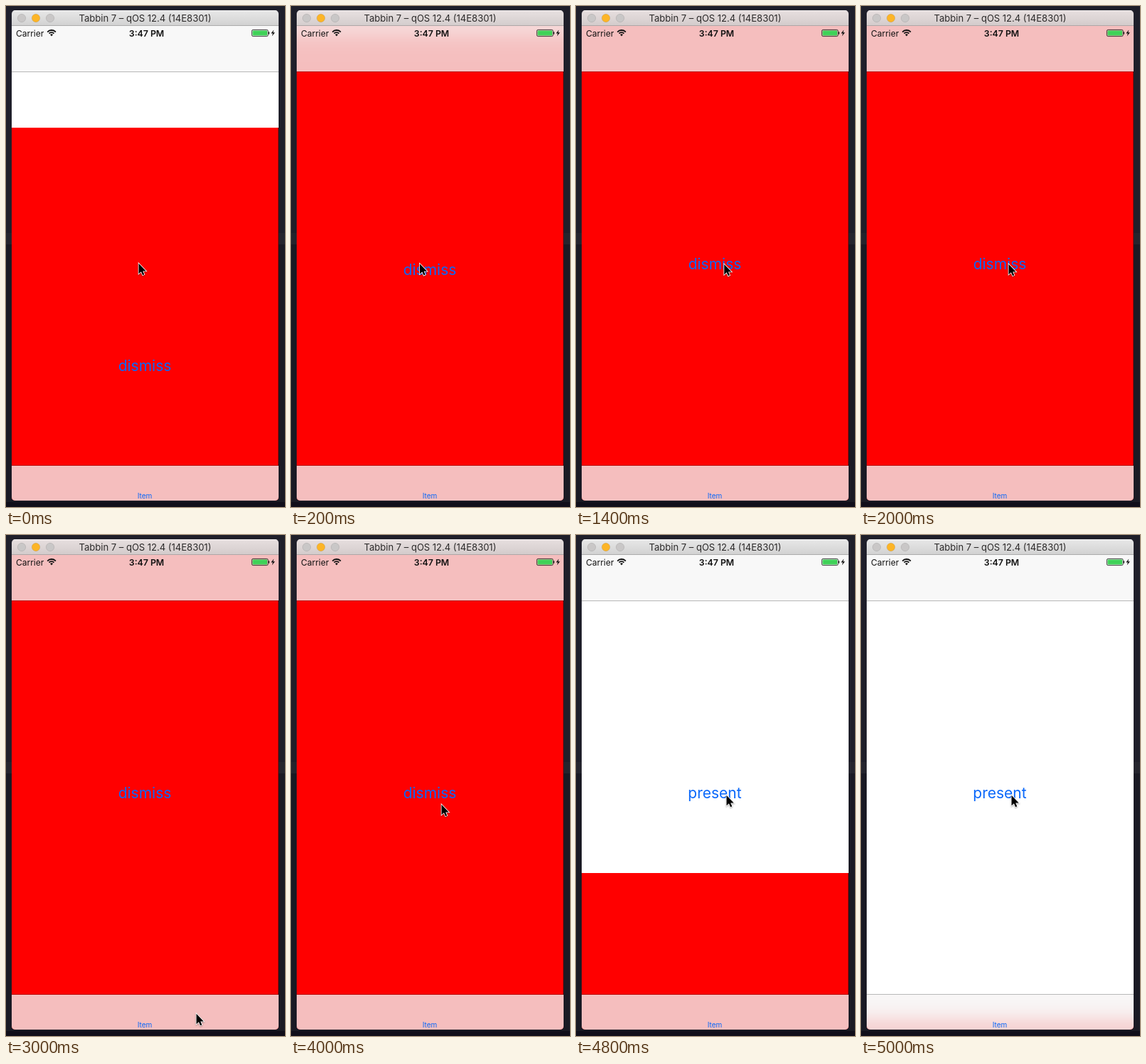
An HTML page with a canvas for the animation above (5.1 s loop, 392 by 704 pixels).

```html
<!DOCTYPE html>
<html lang="en">
<head>
<meta charset="utf-8">
<title>Modal transition</title>
<style>
html, body { margin: 0; width: 100%; height: 100%; overflow: hidden; background: #1d1d28; }
canvas { display: block; width: 392px; height: 704px; }
</style>
</head>
<body>
<canvas id="stage" width="392" height="704"></canvas>
<script>
const ctx = document.getElementById('stage').getContext('2d');
const LOOP = 5100, STEP = 100;
const LEFT = 8, WIDTH = 375, TOP = 28, BOTTOM = 695;
const NAV_END = 92, TAB_START = 646;
const BLUE = '#0a68fa', INK = '#111', HAIRLINE = 'rgba(0,0,0,.28)';

// Places the pointer glides between: label, tab bar, nav bar, label
const stops = [
  { at: 0, x: 186, y: 361 },
  { at: 900, x: 142, y: 364 },
  { at: 1500, x: 213, y: 362 },
  { at: 2000, x: 207, y: 362 },
  { at: 3000, x: 267, y: 672 },
  { at: 3600, x: 236, y: 46 },
  { at: 4000, x: 211, y: 378 },
  { at: 4300, x: 211, y: 365 }
];

const clamp = (v, lo, hi) => Math.min(hi, Math.max(lo, v));
const mix = (a, b, k) => a + (b - a) * k;
const smooth = k => k * k * (3 - 2 * k);

// Share of the distance left in a critically damped spring
function springLeft(ms) {
  const x = Math.max(0, ms) * 0.0176;
  return (1 + x) * Math.exp(-x);
}

function modalTop(t) {
  const hidden = t < 4600 ? springLeft(t + 165) : 1 - springLeft(t - 4669);
  return TOP + Math.round((BOTTOM - TOP) * hidden);
}

function pointerAt(t) {
  const i = stops.findIndex(s => s.at > t);
  if (i < 0) return stops[stops.length - 1];
  const a = stops[i - 1], b = stops[i];
  const k = smooth((t - a.at) / (b.at - a.at));
  return { x: mix(a.x, b.x, k), y: mix(a.y, b.y, k) };
}

function rect(color, x, y, w, h) {
  ctx.fillStyle = color;
  ctx.fillRect(x, y, w, h);
}

function text(str, x, y, size, color, weight = 400, align = 'center') {
  ctx.font = `${weight} ${size}px Inter, sans-serif`;
  ctx.textAlign = align;
  ctx.fillStyle = color;
  ctx.fillText(str, x, y);
}

// Translucent bar: blurs the red edge behind it, mirrored at the bar's own ends
function blurBar(a, b, edge) {
  const soft = d => 1 / (1 + Math.exp(-d / 9));
  const e = clamp(edge, a, b);
  for (let y = a; y < b; y++) {
    let red = 1 + soft(y - e) - soft(y - 2 * b + e) - soft(y - 2 * a + e);
    if (edge <= a) red = 1;
    if (edge >= b) red = 0;
    const tint = mix(248, 190, red);
    rect(`rgb(${mix(248, 245, red)},${tint},${tint})`, LEFT, y, WIDTH, 1);
  }
}

function drawBackdrop() {
  rect('#1f1f2a', 0, 0, 392, 319);
  rect('#25252e', 0, 319, 392, 16);
  rect('#1a1a24', 0, 335, 392, 362);
  rect('#100e1a', 0, 697, 392, 7);
}

function drawTitleBar(red) {
  const g = ctx.createLinearGradient(0, 6, 0, TOP);
  g.addColorStop(0, '#e8e8e8');
  g.addColorStop(1, '#d1d1d1');
  rect(g, LEFT, 6, WIDTH, TOP - 6);
  rect(`rgba(225,150,150,${red * 0.1})`, LEFT, 6, WIDTH, TOP - 6);
  rect('rgba(255,255,255,.5)', LEFT, 6, WIDTH, 1);
  rect('rgba(0,0,0,.18)', LEFT, TOP - 1, WIDTH, 1);
  for (let i = 0; i < 3; i++) {
    ctx.beginPath();
    ctx.arc(22 + i * 20, 17, 5.7, 0, 7);
    ctx.fillStyle = i === 1 ? '#fdb527' : '#c9c7c7';
    ctx.fill();
    ctx.strokeStyle = 'rgba(0,0,0,.13)';
    ctx.lineWidth = 0.8;
    ctx.stroke();
  }
  text('Tabbin 7 – qOS 12.4 (14E8301)', 195.5, 22, 13, '#2c2a2a');
}

function drawWifi(x, y) {
  const from = -Math.PI * 0.76, to = -Math.PI * 0.24;
  ctx.strokeStyle = ctx.fillStyle = INK;
  ctx.lineWidth = 1.8;
  for (const r of [4.8, 8]) {
    ctx.beginPath();
    ctx.arc(x, y, r, from, to);
    ctx.stroke();
  }
  ctx.beginPath();
  ctx.moveTo(x, y + 0.5);
  ctx.arc(x, y, 2.6, from, to);
  ctx.fill();
}

function drawBattery() {
  ctx.strokeStyle = INK;
  ctx.lineWidth = 0.8;
  ctx.beginPath();
  ctx.roundRect(345.4, 33.4, 22.8, 9.2, 1.8);
  ctx.stroke();
  rect('#3fd158', 346.5, 34.5, 20.6, 7);
  rect(INK, 368.8, 36.3, 1.2, 3.4);
  ctx.fill(new Path2D('M376.3 33.5l-4 5h2.6l-1.2 4 4.2-5.2h-2.6z'));
}

function drawStatus() {
  text('Carrier', 14, 42.5, 12, INK, 400, 'left');
  text('3:47 PM', 197.5, 42.5, 12.3, INK, 600);
  drawWifi(64, 42);
  drawBattery();
}

function drawPointer({ x, y }) {
  const arrow = new Path2D('M0 0V14.5L3.4 11.4 5.6 16.4 7.8 15.4 5.7 10.6H10.2Z');
  ctx.save();
  ctx.translate(x + 0.5, y + 0.8);
  ctx.shadowColor = 'rgba(0,0,0,.35)';
  ctx.shadowBlur = 2;
  ctx.shadowOffsetY = 1;
  ctx.strokeStyle = '#fff';
  ctx.lineWidth = 1.6;
  ctx.stroke(arrow);
  ctx.shadowColor = 'transparent';
  ctx.fillStyle = '#000';
  ctx.fill(arrow);
  ctx.restore();
}

function drawModal(t, edge) {
  rect('#f00', LEFT, edge, WIDTH, BOTTOM - edge);
  rect('rgba(0,0,0,.4)', LEFT + WIDTH - 1, edge, 1, BOTTOM - edge);
  // The label dims when pressed, then recovers
  ctx.globalAlpha = t < 4500 ? 1 : clamp(0.2 + (t - 4600) / 1000, 0.2, 1);
  text('dismiss', 195, edge + 342, 21, BLUE);
  ctx.globalAlpha = 1;
}

function draw(t) {
  const edge = modalTop(t);
  drawBackdrop();

  ctx.save();
  ctx.beginPath();
  ctx.roundRect(LEFT, 6, WIDTH, BOTTOM - 6, 5);
  ctx.clip();
  rect('#fff', LEFT, TOP, WIDTH, BOTTOM - TOP);
  text('present', 195, 370, 21, BLUE);
  drawModal(t, edge);
  blurBar(TOP, NAV_END, edge);
  blurBar(TAB_START, BOTTOM, edge);
  rect(HAIRLINE, LEFT, NAV_END, WIDTH, 1);
  rect(HAIRLINE, LEFT, TAB_START - 1, WIDTH, 1);
  drawTitleBar(clamp((NAV_END - edge) / 64, 0, 1));
  drawStatus();
  text('Item', 195, 691.5, 10, BLUE);
  ctx.restore();

  drawPointer(pointerAt(t));
}

function frame() {
  const t = performance.now() % LOOP;
  draw(Math.floor(t / STEP) * STEP);
  requestAnimationFrame(frame);
}
frame();
</script>
</body>
</html>
```
